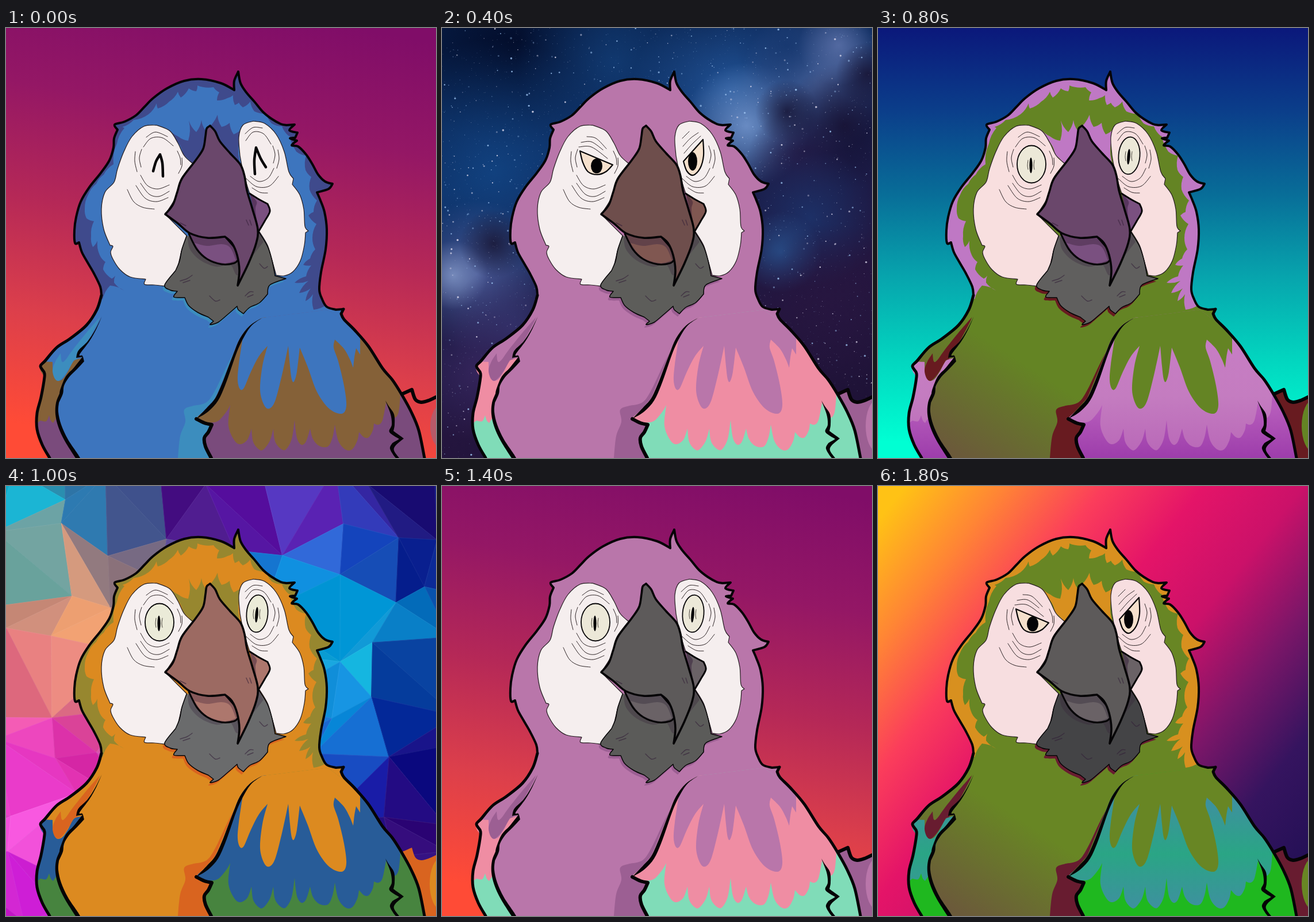
An HTML page with a canvas that plays this animation: 748x748 px, repeating every 2000 ms.

```html
<!DOCTYPE html>
<html lang="en">
<head>
<meta charset="utf-8">
<title>Parrot portraits</title>
<style>
html, body { margin: 0; width: 100%; height: 100%; overflow: hidden; background: #000; }
canvas { display: block; width: 748px; height: 748px; }
</style>
</head>
<body>
<canvas id="stage" width="748" height="748"></canvas>
<script>
const SIZE = 748, STEP = 200;

// Smooth runs of points; "|" marks a sharp corner.
function curve(text) {
  const path = new Path2D();
  let last = null;
  for (const run of text.split('|')) {
    const n = run.trim().split(/\s+/).map(Number);
    const pts = [];
    for (let i = 0; i < n.length; i += 2) pts.push([n[i], n[i + 1]]);
    if (!last) path.moveTo(...pts[0]);
    else if (String(last) !== String(pts[0])) pts.unshift(last);
    for (let i = 0; i < pts.length - 1; i++) {
      const b = pts[i], c = pts[i + 1], a = pts[i - 1] || b, d = pts[i + 2] || c;
      path.bezierCurveTo(b[0] + (c[0] - a[0]) / 6, b[1] + (c[1] - a[1]) / 6,
        c[0] - (d[0] - b[0]) / 6, c[1] - (d[1] - b[1]) / 6, c[0], c[1]);
    }
    last = pts[pts.length - 1];
  }
  return path;
}

// Feathered edge: every point is a tip, joined by slightly bent strokes.
function feather(text) {
  const n = text.trim().split(/\s+/).map(Number);
  const path = new Path2D();
  path.moveTo(n[0], n[1]);
  for (let i = 2; i < n.length; i += 2) {
    const dx = n[i] - n[i - 2], dy = n[i + 1] - n[i - 1];
    path.quadraticCurveTo(n[i - 2] + dx / 2 - dy * .14, n[i - 1] + dy / 2 + dx * .14, n[i], n[i + 1]);
  }
  return path;
}

function random(seed) {
  return () => (seed = (seed * 16807) % 2147483647) / 2147483647;
}

const leftFlank = '76 748 63 725 54 698 54 670 61 642 67 607 66 598|60 588 68 579 88 556 112 540 140 517 158 490 166 465';
const leftHead = '166 465 164 450 153 427 142 408 132 390 127 373|120 374 119 352 122 329 130 302 145 277 165 252 180 230 187 208 188 192 194 177|189 168 206 163 226 152 241 137 256 122 280 105 310 92 340 89 374 96 397 108|397 92 404 76';
const rightHead = '404 76 408 96 418 112 432 128 447 146 462 158 478 167 488 169|502 168|493 178 507 182|503 191|494 192 506 196|497 204 508 206 522 220 533 237 543 255 555 267 568 271|561 280 541 286|547 300 554 320 558 350 556 385 548 425 545 455 550 472 558 485 574 490|587 489';
const rightFlank = '587 489 583 497|588 507 606 525 630 553 655 592 672 612 688 637 705 668 718 700 728 748';
const wingEdge = '446 504 424 518 407 540 396 566 386 592 376 618 364 644 350 662|331 680 345 687 358 690|352 703 345 713 347 728 357 748';
const scallops = '331 680 348 686 368 684 383 668 390 656|387 692 397 717 408 724 420 716 427 697|430 720 440 733 448 733 459 718 465 697|468 719 478 732 487 733 497 715 502 682|506 713 514 725 522 719 529 697|534 715 545 727 560 728 568 712 572 690|578 718 590 733 602 733 611 718 614 703|623 712 631 712 638 700 640 688|648 690 655 682 661 652|668 668 676 678 683 668 686 640|650 520|420 500';

const P = {
  body: curve([leftFlank, leftHead, rightHead, rightFlank].join('|')),
  leftFlank: curve(leftFlank), leftHead: curve(leftHead),
  rightHead: curve(rightHead), rightFlank: curve(rightFlank),
  wing: curve(wingEdge + '|728 748|718 700 705 668 688 637 655 592 630 553 606 525|560 490|446 504'),
  mid: curve(scallops),
  fingers: curve('412 538 405 585 403 613 407 628 414 626 426 598 440 571 455 553|446 588 442 630 449 656 458 662 468 649 479 608 487 572 491 553|494 588 497 611 501 615 506 598 511 556|525 590 541 633 562 662 584 671 592 657 588 622 578 580 570 556 572 542|588 558 598 576 604 591|606 573 609 557|616 568|616 530|570 480|430 500'),
  wingLine: curve('446 504 424 518 407 540 396 566 386 592 376 618 364 644 350 660|331 680|352 667 369 648 381 622 391 594 400 568 410 545 426 519 446 504'),
  wingFoot: curve('331 680 345 687 358 690|352 703 345 713 347 728 357 748'),
  wingSpike: curve('660 648 666 658 675 672 676 690 674 701|692 714|678 726 675 735 684 748|678 748 668 732 672 722|684 715|667 703 671 690 669 672 660 648'),
  bodyShade: curve('412 538 388 580 365 628 349 651 326 657|310 664 312 685 303 710 299 748|357 748|345 713|358 690|331 680|364 644|396 566'),
  leftWing: curve('76 748 63 725 54 698 54 670 61 642 67 607|60 588 88 556 112 540 140 517 166 495|155 525 142 545 128 561|124 575 134 573|120 592 106 607 98 636|88 655 90 680 100 710 126 748'),
  leftMid: curve('50 580 81 581|82 600 88 613 98 611 108 597 118 579 135 570|140 600|82 687|78 683 75 674|70 684 60 683|50 690'),
  leftShade: curve('166 500 140 530 116 560 103 578 97 580 95 566|86 580 81 595 85 610 93 613 105 600 118 578|134 573|128 561 142 545 166 500'),
  leftLine: curve('167 501 155 525 142 545 126 561 122 574|133 572|118 591 104 606 95 627 93 636|87 652 86 672 91 694 102 718 121 748|129 748 108 716 96 690 91 668 92 652|99 636 101 622 110 607 123 594 136 580|133 570 128 568 145 545 157 524 167 501'),
  tail: curve('688 637 706 629|712 646 722 651 735 648 748 642|748 748|726 748|716 698 688 637'),
  tailLine: curve('686 638 706 629|712 646 722 651 735 648 750 641'),
  crown: feather('185 182 203 172 222 160 248 150 262 131 264 140 284 128 299 111 304 121 318 105 331 110 333 100 361 103 371 112 367 126 385 122 395 117 398 134 405 130 412 138 425 128 432 145 453 149 462 166 480 171 492 188 520 165 404 70 340 80 240 130 180 160'),
  brow: feather('280 172 300 189 317 196 318 161 331 181 340 160 347 178 368 151 375 172 389 165 396 185 411 174 405 200 409 240 355 260 323 236 308 221 300 200'),
  leftSide: feather('206 174 193 201 187 237 170 255 157 271 143 290 137 315 140 331 153 336 148 362 151 381 159 370 163 395 173 407 169 420 184 436 190 431 188 443 206 457 181 448 168 472 100 400 110 280 180 160'),
  rightSide: feather('492 178 505 215 522 222 521 247 531 259 528 281 541 300 535 320 526 326 540 341 533 365 538 385 529 401 517 412 531 413 522 432 502 443 526 440 510 461 530 453 521 475 534 463 535 490 560 480 580 270 510 165'),
  faceLeft: curve('262 169 240 171 219 189 205 215 194 245 188 268 172 286 166 315 170 350 181 378|186 380 182 390 186 402 198 420 216 433 243 437|241 446 258 447 276 449|296 422 302 402 306 385 315 362|277 324|298 290 305 262 325 236|310 222 299 200 285 179 262 169'),
  faceRight: curve('430 162 412 169 405 190 407 222|414 255 430 300 459 318|440 353|455 378 463 405 470 430|484 431 499 424 512 405 519 378 521 356|526 353|520 345 518 315 511 290 498 272|500 262|492 250 484 215 470 185 450 166 430 162'),
  chin: curve('314 362 306 385 302 405 295 422|276 447 286 456 298 458|292 468 311 469|318 483 334 495 352 503|361 510|355 516 369 512 386 498 402 484|404 490 413 497|424 486 441 478 455 463|459 447 487 436|468 431|463 405 455 380 440 355'),
  chinShade: curve('316 364 320 385 338 404 365 415 390 412 404 430 430 395 448 372|440 355'),
  beak: curve('355 170 364 180 372 197 390 218 408 238 415 258 419 282 429 316 438 350 435 375 422 409 403 448|406 422 402 395 393 374 381 363|350 365 320 357 299 340 277 324|290 308 298 285 306 262 330 230 343 210 347 188 349 175 355 170'),
  flank: curve('424 288 440 298 455 306|459 319 450 336 440 353'),
  flankShade: curve('424 288 436 302 434 316 438 350|428 312'),
  jaw: curve('318 358 332 385 350 402 375 411 397 409 405 402|402 388 381 363'),
  tongue: curve('328 374 350 379 375 376 390 382 400 404|380 409 352 401 337 388')
};

const eyeShapes = {
  angry: {
    lids: [curve('240 214|297 238|285 250 270 255 254 250 245 234 240 214'), curve('454 194|420 232|426 249 437 256 449 244 455 222 454 194')],
    pupils: [[269, 240, 10, 13], [436, 232, 8, 16]]
  },
  bored: {
    lids: [curve('240 224|294 228|292 247 282 263 270 269 256 265 245 248 240 224'), curve('417 224|463 219|460 238 449 251 437 257 425 249 417 224')],
    pupils: [[268, 241, 7, 15], [436, 236, 6, 14]]
  }
};
const wrinkles = curve('236 258 248 276 265 281 285 273');
const folds = ['234 256 246 274 264 280 284 273', '234 270 249 289 266 293 284 284', '226 274 242 296 262 302 282 295', '211 281 222 302 238 312 258 315',
  '225 215 224 232 228 250', '236 211 232 226 235 242', '306 226 306 240 300 253', '298 214 303 226 304 238',
  '425 258 440 267 456 261 466 244', '418 262 436 276 458 275 474 258', '428 278 442 286 455 287', '464 205 468 220 465 235', '473 212 475 228 471 244'];
const brows = {
  round: ['239 207 252 192 272 191 291 205', '244 190 260 181 281 189', '417 196 430 181 448 184 461 202', '416 184 430 173 446 174'],
  angry: ['238 207 260 207 288 227', '242 199 260 198 280 212', '252 189 268 192 286 210', '421 218 435 202 450 188', '419 206 432 192 446 182', '418 192 430 180'],
  bored: ['239 215 265 213 292 219', '243 205 268 203 287 210', '250 196 270 193 282 200', '220 318 236 328 255 330', '418 215 440 209 461 212', '420 205 440 198 456 202', '424 194 440 188 452 193']
};
brows.happy = brows.round;
const nicks = curve('304 341 311 344|314 345');
const ticks = ['303 339 313 344', '418 334 422 343', '424 334 427 343', '303 440 315 436 324 430', '308 443 320 439', '354 466 364 475 372 473', '416 466 424 459 430 459', '420 468 430 464', '441 410 449 418 455 415'];

function line(g, path, width, color = '#050406') {
  g.lineWidth = width;
  g.strokeStyle = color;
  g.stroke(path);
}
function fill(g, path, color) {
  g.fillStyle = color;
  g.fill(path);
}
function clipped(g, path, draw) {
  g.save();
  g.clip(path);
  draw();
  g.restore();
}
function ramp(g, box, colors) {
  const grad = g.createLinearGradient(...box);
  colors.forEach((c, i) => grad.addColorStop(i / (colors.length - 1), c));
  return grad;
}
const paint = (g, color, box) => Array.isArray(color) ? ramp(g, box, color) : color;
function oval(x, y, rx, ry, turn = 0) {
  const p = new Path2D();
  p.ellipse(x, y, rx, ry, turn, 0, Math.PI * 2);
  return p;
}
function glow(g, x, y, r, color, alpha = 1) {
  const grad = g.createRadialGradient(x, y, 0, x, y, r);
  grad.addColorStop(0, color);
  grad.addColorStop(1, color.slice(0, 7) + '00');
  g.globalAlpha = alpha;
  g.fillStyle = grad;
  g.fillRect(x - r, y - r, 2 * r, 2 * r);
  g.globalAlpha = 1;
}
function backdrop(g, color) {
  g.fillStyle = color;
  g.fillRect(0, 0, SIZE, SIZE);
}

const rgb = hex => [0, 2, 4].map(i => parseInt(hex.substr(i, 2), 16));
function lowPoly(g, text, seed) {
  const rnd = random(seed), cells = 8, cell = SIZE / cells;
  const spots = text.trim().split(/\s*,\s*/).map(s => {
    const [x, y, hex] = s.split(' ');
    return { x: +x, y: +y, c: rgb(hex) };
  });
  const tone = (x, y) => {
    let sum = [0, 0, 0], total = 0;
    for (const s of spots) {
      const w = 1 / (((x - s.x) ** 2 + (y - s.y) ** 2) ** 2 + 1);
      total += w;
      sum = sum.map((v, i) => v + s.c[i] * w);
    }
    const shift = (rnd() - .5) * 22;
    return `rgb(${sum.map(v => Math.max(0, Math.min(255, v / total + shift)) | 0)})`;
  };
  const grid = [];
  for (let j = 0; j <= cells + 2; j++) {
    grid.push([]);
    for (let i = 0; i <= cells + 2; i++)
      grid[j].push([(i - 1 + (rnd() - .5) * .75) * cell, (j - 1 + (rnd() - .5) * .75) * cell]);
  }
  const tri = (...pts) => {
    const p = new Path2D();
    pts.forEach(q => p.lineTo(...q));
    p.closePath();
    const mean = k => (pts[0][k] + pts[1][k] + pts[2][k]) / 3;
    const color = tone(mean(0), mean(1));
    fill(g, p, color);
    line(g, p, 1, color);
    line(g, p, .7, 'rgba(255,255,255,.09)');
  };
  for (let j = 0; j < cells + 2; j++) for (let i = 0; i < cells + 2; i++) {
    const a = grid[j][i], b = grid[j][i + 1], c = grid[j + 1][i], d = grid[j + 1][i + 1];
    if (rnd() < .5) { tri(a, b, c); tri(b, d, c); } else { tri(a, b, d); tri(a, d, c); }
  }
}

function blade(g, x, y, tx, ty, w, color) {
  const dx = tx - x, dy = ty - y, len = Math.hypot(dx, dy);
  const nx = -dy / len * w, ny = dx / len * w, mx = x + dx * .5, my = y + dy * .5;
  g.fillStyle = color;
  g.beginPath();
  g.moveTo(x, y);
  g.quadraticCurveTo(mx + nx, my + ny, tx, ty);
  g.quadraticCurveTo(mx - nx, my - ny, x, y);
  g.fill();
}
function leaf(g, x, y, tx, ty, sides) {
  for (const tips of sides) for (let i = 0; i < tips.length; i += 2) {
    const t = i / tips.length * .8;
    blade(g, x + (tx - x) * t, y + (ty - y) * t, tips[i], tips[i + 1], 17, i % 4 ? '#43ec08' : '#52fb0b');
  }
  blade(g, x, y, tx, ty, 20, '#4bf20a');
  g.lineWidth = 1.5;
  g.strokeStyle = '#22a006';
  g.beginPath();
  g.moveTo(x, y);
  g.lineTo(tx, ty);
  g.stroke();
}
function palm(g, x, y, tx, ty, n, dx, dy, colors) {
  for (let i = 0; i < n; i++) {
    const t = i / (n - 1), px = x + (tx - x) * t, py = y + (ty - y) * t, k = 1 - t * .45;
    blade(g, px, py, px + dx * k, py + dy * k, 8, colors[i % colors.length]);
  }
}

const scenes = {
  sunset: g => backdrop(g, ramp(g, [440, -30, 300, 740], ['#800d68', '#941765', '#b52857', '#dc3f4b', '#ff4b36'])),
  lagoon: g => backdrop(g, ramp(g, [0, 0, 0, 720], ['#0b187b', '#0b3e8a', '#086d98', '#07a4ad', '#02d5bf', '#00ffd3'])),
  neon: g => backdrop(g, ramp(g, [0, 60, 748, 650], ['#ffc215', '#ff8435', '#fb3d5b', '#e41468', '#cb1169', '#7b1668', '#35145f', '#241056'])),
  galaxy: g => {
    backdrop(g, ramp(g, [200, 0, 480, 748], ['#071c44', '#0c2a5e', '#1a1c48', '#24153e', '#1e1236']));
    const clouds = '120 40 170 #020a26,90 250 230 #124584,300 60 170 #123c74,500 110 170 #255a9f,530 170 110 #7698cf,650 90 130 #526ca5,600 30 90 #15366e,700 170 110 #160f30,620 230 90 #241a45,640 330 120 #1d346c,590 390 70 #29528e,60 430 130 #5262a0,20 430 60 #7f94c4,90 375 60 #191736,120 520 110 #34326c,60 600 120 #37265e,680 480 140 #271640,690 30 70 #5a70a8,600 145 55 #171536,740 80 55 #191536';
    for (const c of clouds.split(',')) {
      const [x, y, r, hex] = c.split(' ');
      glow(g, +x, +y, +r, hex, .85);
    }
    const rnd = random(77);
    for (let i = 0; i < 3600; i++) {
      const x = rnd() * SIZE, y = rnd() * SIZE, r = .35 + rnd() ** 6 * 1.5;
      g.globalAlpha = .25 + rnd() * .65;
      fill(g, oval(x, y, r, r), rnd() < .6 ? '#9ec4f2' : '#e7e2f4');
    }
    g.globalAlpha = 1;
  },
  prism: g => lowPoly(g, '0 20 10b0d0,80 90 6f9a98,25 120 55aaa8,150 30 2a78b0,230 60 3a4e88,190 110 8a6f78,100 180 e09a78,130 250 f2a272,30 230 c88a78,50 300 e07878,70 380 f06a90,30 480 f040d0,110 490 e030b0,40 600 f050d8,30 720 c818d0,320 20 481085,430 40 6018a8,560 20 5a14a8,700 20 170a70,500 90 3a50d0,500 150 1090e0,610 90 1848c0,710 130 0a2090,580 210 00a0e0,580 290 10c0e0,680 240 0a80c8,710 350 0a40a0,590 400 1090e0,570 470 2060d0,650 420 0a50c0,640 500 1010a0,720 450 100a80,700 600 300878', 431),
  ember: g => lowPoly(g, '20 40 e01808,110 40 ee2c10,200 80 ff4818,340 50 ff5018,60 130 f03010,30 200 ff5018,140 210 ff6a18,60 270 ff7a20,100 340 ff8a20,100 410 ff9425,130 460 e0a048,30 470 e07028,90 510 d08030,20 540 b04830,90 570 a06030,30 630 8a4030,30 710 6a3a34,430 90 ff6820,480 30 d83a30,570 50 c83a34,660 40 a02828,725 40 702028,640 140 a86040,540 160 c87840,710 150 7a5040,690 210 8a8050,560 250 c8b868,640 250 90a870,570 350 a0d898,640 360 90d8a0,710 340 78a48c,590 430 98d8d8,650 430 70b0d0,720 430 5090b8,600 490 70c0f8,650 550 3a98e0,715 590 2070b8', 905),
  jungle: g => {
    backdrop(g, '#222220');
    glow(g, 190, 50, 110, '#8c9186', .75);
    glow(g, 540, 60, 105, '#7d8578', .65);
    const dark = ['#126516', '#0b4a12', '#238f1a'], bright = ['#3fe41a', '#2cbc18'];
    palm(g, 0, -20, 215, 95, 19, -14, 118, dark);
    palm(g, 10, -30, 125, 15, 8, 0, 85, dark);
    palm(g, 145, -15, 255, -20, 8, 70, 88, bright);
    palm(g, 560, -10, 448, 45, 12, 5, 85, dark);
    palm(g, 650, -30, 560, 0, 8, -30, 75, dark);
    palm(g, 748, -10, 583, 115, 17, -12, 90, ['#0e6418', '#1d8b1e', '#0b4b14']);
    palm(g, 748, -30, 670, -5, 7, -5, 75, dark);
    leaf(g, -8, 115, 88, 318, [[70, 115, 115, 172, 122, 212, 112, 244, 98, 275], [-8, 205, 2, 232, 20, 278, 54, 296]]);
    leaf(g, -10, 330, 52, 570, [[58, 347, 85, 383, 103, 430, 107, 465, 94, 492, 71, 540], [-15, 440, -8, 480, 0, 512, 24, 546]]);
    leaf(g, 752, 95, 680, 262, [[690, 135, 662, 170, 660, 200, 674, 226], [755, 180, 742, 218, 714, 256]]);
    leaf(g, 754, 300, 622, 512, [[650, 330, 615, 362, 602, 392, 605, 437, 620, 468], [750, 400, 730, 450, 696, 478, 668, 500]]);
  }
};

const coats = {
  blue: { body: '#3d75be', accent: '#3f4a8c', shade: '#3c8dbe', mid: '#856138', low: '#7a4b7c', tail: null },
  pink: { body: '#b976aa', shade: '#9c5f93', mid: '#ef8da3', low: '#80dcb8' },
  violet: { body: '#8378bb', shade: '#6a5fa3', mid: '#cf8cf0', low: '#b0dc80' },
  amber: { body: '#dc8a20', accent: '#97872f', shade: '#d9641f', mid: '#285c98', low: '#47843f', bareTail: true },
  moss: { body: ['#648424', '#648424', '#6b5a3a'], accent: '#bf78c4', shade: '#681b20', mid: ['#c77dc4', '#c47cc0', '#b968b8'], low: ['#b65cbb', '#9d3dab'] },
  jade: { body: ['#688624', '#688624', '#6b5a3a'], accent: '#d8901f', shade: '#681c30', mid: ['#3f8fa0', '#2aa585', '#3f8fa0'], low: '#1fb81f' }
};
const beaks = { plum: ['#6a476b', '#7a5080'], brown: ['#6e4e4c', '#805751'], rose: ['#9c6a62', '#ad776d'], pale: ['#d3cfd0', '#c5b8cc'], slate: ['#5d5a5a', '#6a6266'] };

const looks = [
  { scene: 'sunset', coat: 'blue', beak: 'plum', eyes: 'happy', face: '#f5eded', chin: '#5e5d5b' },
  { scene: 'lagoon', coat: 'violet', beak: 'brown', eyes: 'angry', face: '#f5eeee', chin: '#5b5b59' },
  { scene: 'galaxy', coat: 'pink', beak: 'brown', eyes: 'angry', face: '#f5eeee', chin: '#5d5d5a' },
  { scene: 'neon', coat: 'blue', beak: 'slate', eyes: 'bored', face: '#f5eeee', chin: '#5b5b59' },
  { scene: 'lagoon', coat: 'moss', beak: 'plum', eyes: 'round', face: '#f8dfdf', chin: '#605f5e', iris: '#ece8d8' },
  { scene: 'prism', coat: 'amber', beak: 'rose', eyes: 'round', face: '#f6efef', chin: '#6a6b6c', iris: '#ebebd8' },
  { scene: 'ember', coat: 'violet', beak: 'plum', eyes: 'bored', face: '#f8dedd', chin: '#5b5b59', thin: true },
  { scene: 'sunset', coat: 'pink', beak: 'slate', eyes: 'round', face: '#f5eeee', chin: '#5b5b59', iris: '#ece8d8' },
  { scene: 'jungle', coat: 'violet', beak: 'pale', eyes: 'angry', face: '#f5eeee', chin: '#565655' },
  { scene: 'neon', coat: 'jade', beak: 'slate', eyes: 'angry', face: '#f7dee0', chin: '#444446' }
];

function drawEyes(g, kind, iris = '#f5e0cc') {
  for (const f of folds.concat(brows[kind])) line(g, curve(f), 1, '#2b2224');
  if (kind === 'happy') {
    line(g, curve('256 249 261 232 268 220|272 235 273 258'), 4.5);
    line(g, curve('433 254 432 230 435 208|443 227 452 242'), 4.5);
  } else if (kind === 'round') {
    for (const [x, y, rx, turn] of [[267, 237, 25, 0], [437, 222, 18.5, .08]]) {
      const ball = oval(x, y, rx, 32.5, turn);
      fill(g, ball, iris);
      line(g, ball, 1.8);
      fill(g, oval(x - 1, y + 2, 2.6, 13.5, turn), '#050406');
      for (const d of [-6, 5]) line(g, curve(`${x + d} ${y - 7} ${x + d - 1} ${y + 2} ${x + d} ${y + 9}`), 1, '#4a443e');
    }
  } else {
    const { lids, pupils } = eyeShapes[kind];
    lids.forEach((lid, i) => {
      fill(g, lid, iris);
      clipped(g, lid, () => fill(g, oval(...pupils[i]), '#050406'));
      line(g, lid, 2.2);
    });
  }
}

function drawBird(g, look) {
  const c = coats[look.coat], [beak, beakLight] = beaks[look.beak];
  const body = paint(g, c.body, [360, 420, 150, 748]);
  const mid = paint(g, c.mid, [0, 540, 0, 740]);
  const low = paint(g, c.low, [0, 660, 0, 748]);
  if (c.tail !== null) {
    fill(g, P.tail, c.shade);
    clipped(g, P.tail, () => fill(g, oval(757, 692, 20, 45), body));
  } else {
    fill(g, oval(758, 693, 20, 38), '#b75a68');
  }
  if (!c.bareTail) line(g, P.tailLine, 6);

  fill(g, P.body, body);
  clipped(g, P.body, () => {
    if (c.accent) for (const k of ['crown', 'brow', 'leftSide', 'rightSide']) fill(g, P[k], c.accent);
    fill(g, P.bodyShade, c.shade);
    g.save();
    g.translate(-3, 5);
    fill(g, P.chin, c.shade);
    g.restore();
  });
  clipped(g, P.wing, () => {
    fill(g, P.wing, low);
    fill(g, P.mid, mid);
    fill(g, P.fingers, body);
  });
  clipped(g, P.leftWing, () => {
    g.fillStyle = low;
    g.fillRect(40, 640, 100, 108);
    fill(g, P.leftMid, mid);
    fill(g, P.leftShade, c.shade);
  });

  const edge = look.thin ? 1.4 : 4;
  line(g, P.leftHead, edge);
  line(g, P.leftFlank, look.thin ? 2.5 : 5);
  line(g, P.rightHead, 4);
  line(g, P.rightFlank, 5);
  for (const k of ['wingLine', 'wingSpike', 'leftLine']) fill(g, P[k], '#050406');
  line(g, P.wingFoot, 6);

  for (const k of ['faceLeft', 'faceRight']) {
    fill(g, P[k], look.face);
    line(g, P[k], 1.2, '#241c20');
  }
  fill(g, P.chin, look.chin);
  clipped(g, P.chin, () => fill(g, P.chinShade, 'rgba(50,30,55,.3)'));
  line(g, P.chin, 1.5);
  drawEyes(g, look.eyes, look.iris);

  fill(g, P.flank, beakLight);
  fill(g, P.flankShade, 'rgba(40,15,45,.4)');
  line(g, P.flank, 3);
  fill(g, P.jaw, beak);
  fill(g, P.jaw, 'rgba(50,20,60,.2)');
  fill(g, P.tongue, beakLight);
  line(g, P.jaw, 3);
  fill(g, P.beak, beak);
  line(g, P.beak, 3.6);
  for (const t of ticks) line(g, curve(t), 1.4, 'rgba(50,30,55,.6)');
}

function render(look) {
  const sheet = document.createElement('canvas');
  sheet.width = sheet.height = SIZE;
  const g = sheet.getContext('2d');
  g.lineJoin = g.lineCap = 'round';
  scenes[look.scene](g);
  drawBird(g, look);
  return sheet;
}

const stage = document.getElementById('stage').getContext('2d');
const sheets = looks.map(render);
const start = performance.now();
let shown = -1;
function tick() {
  const i = Math.floor((performance.now() - start) / STEP) % sheets.length;
  if (i !== shown) stage.drawImage(sheets[shown = i], 0, 0);
  requestAnimationFrame(tick);
}
tick();
</script>
</body>
</html>
```
